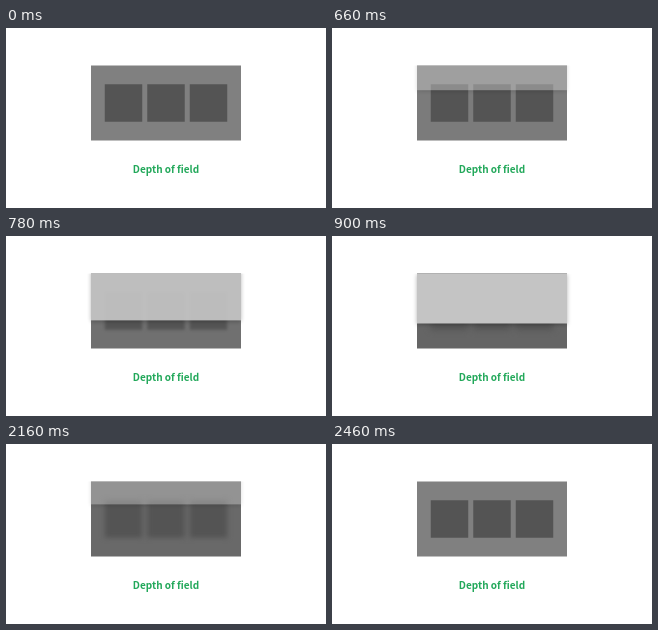
Recreate the animation shown at these times as an HTML page. Size 320 by 180 pixels, loop 3630 ms.

```html
<!DOCTYPE html>
<html lang="en">
<head>
<meta charset="utf-8">
<title>Depth of field</title>
<style>
  html, body { margin: 0; width: 100%; height: 100%; overflow: hidden; background: #fff; }
  svg { display: block; width: 100vw; height: 100vh; }
  text { font: bold 10px "Noto Sans CJK SC", "Noto Sans CJK JP", "Noto Sans CJK", "Noto Sans", sans-serif; fill: #22a85a; }
  #panel { fill: #c4c4c4; filter: drop-shadow(0 1.5px 2px rgba(0, 0, 0, .3)); }
</style>
</head>
<body>
<svg viewBox="0 0 320 180">
  <clipPath id="below"><rect x="70" y="37.5" width="180" height="80"/></clipPath>
  <rect id="card" x="85" y="37.5" width="150" height="75"/>
  <g id="tiles" fill="#545454">
    <rect x="98.75" y="56.25" width="37.5" height="37.5"/>
    <rect x="141.25" y="56.25" width="37.5" height="37.5"/>
    <rect x="183.75" y="56.25" width="37.5" height="37.5"/>
  </g>
  <g clip-path="url(#below)">
    <rect id="panel" x="85" y="37.5" width="150" height="50"/>
  </g>
  <text x="160" y="145" text-anchor="middle">Depth of field</text>
</svg>
<script>
  const LOOP = 3630, OPEN = 600, CLOSE = 2114;
  const [card, tiles, panel] = ['card', 'tiles', 'panel'].map(id => document.getElementById(id));
  const ramp = (t, start, length) => Math.min(1, Math.max(0, (t - start) / length));
  const easeOut = x => 1 - (1 - x) ** 3;

  function draw(now) {
    const t = now % LOOP;
    // The panel moves quickly; the background loses and regains focus more slowly.
    const slide = easeOut(ramp(t, OPEN, 300)) - easeOut(ramp(t, CLOSE, 205));
    const depth = ramp(t, OPEN, 300) - ramp(t, CLOSE, 346);
    const grey = Math.round(128 - 27 * depth);

    card.setAttribute('fill', `rgb(${grey},${grey},${grey})`);
    tiles.style.filter = depth > 0 ? `blur(${3 * depth}px)` : 'none';
    panel.setAttribute('y', 37.5 - 50 * (1 - slide));
    panel.style.opacity = slide;
  }

  const start = performance.now();
  function tick() {
    draw(performance.now() - start);
    requestAnimationFrame(tick);
  }
  tick();
</script>
</body>
</html>
```
